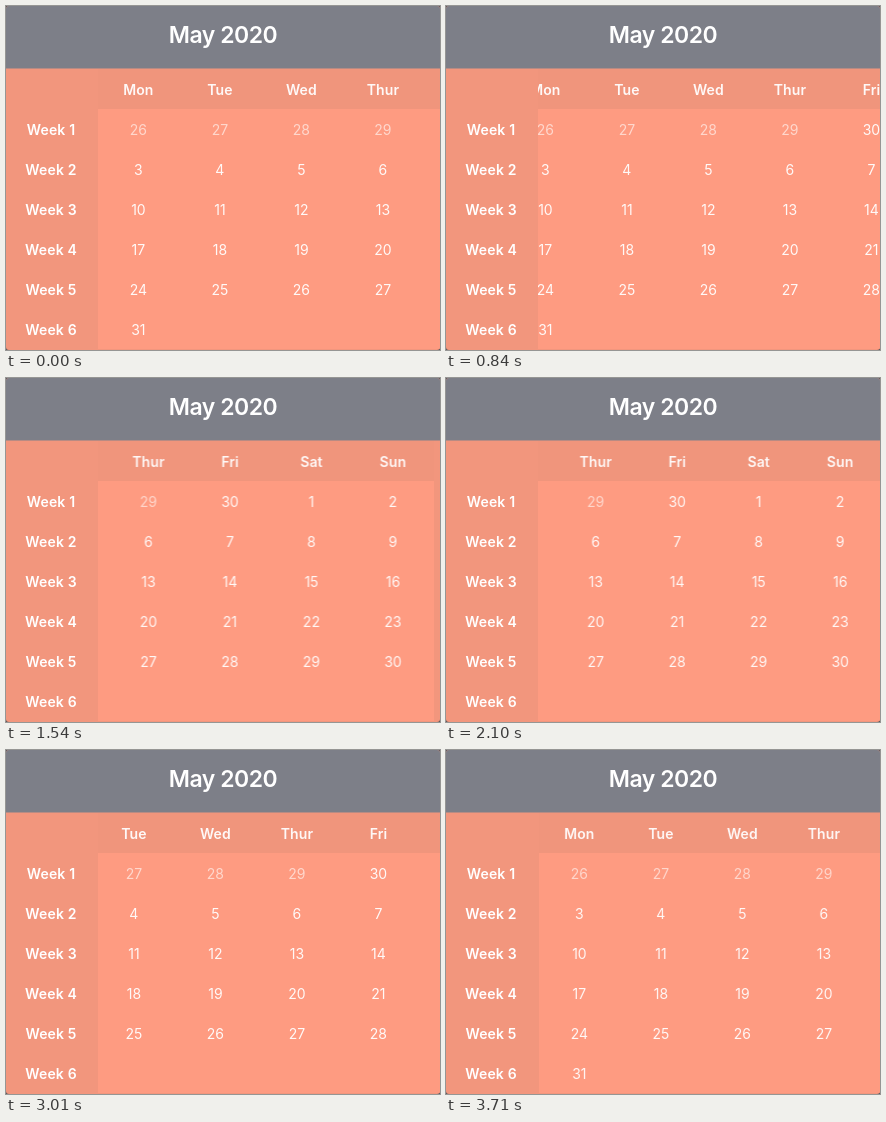
Recreate the animation shown at these times as an HTML page. Size 434x344 px, loop 3.78 s.

```html
<!DOCTYPE html>
<html lang="en">
<head>
<meta charset="utf-8">
<title>Calendar</title>
<style>
  html, body { margin: 0; width: 100%; height: 100%; overflow: hidden; background: #55565c; }
  #app {
    position: relative; width: 434px; height: 344px; overflow: hidden;
    border-radius: 3px; background: #f2967d; color: #fff;
    font: 400 14px/40px Inter, "Open Sans", sans-serif; text-align: center;
  }
  h1 {
    margin: 0; height: 62px; background: #7d7f88; border-bottom: 1px solid #b88b83;
    font-size: 23px; line-height: 58.5px; font-weight: 600; letter-spacing: -.5px;
  }
  #weeks { position: absolute; left: 0; top: 103.5px; width: 90px; font-weight: 600; letter-spacing: .15px; }
  #view { position: absolute; left: 92px; top: 63px; right: 0; bottom: 0; overflow: hidden; }
  #grid { position: absolute; left: 0; top: 0; width: 569.5px; height: 280px; will-change: transform; }
  #grid::before { content: ""; position: absolute; inset: 0 0 auto; height: 40px; background: #f0957c; }
  #grid::after { content: ""; position: absolute; inset: 40px 0 0; background: #fe9b81; }
  #grid span { position: absolute; z-index: 1; width: 80px; height: 40px; opacity: .94; }
  #grid .day { font-weight: 600; letter-spacing: .1px; }
  #grid .dim { opacity: .6; }
</style>
</head>
<body>
<div id="app">
  <h1>May 2020</h1>
  <div id="weeks"></div>
  <div id="view"><div id="grid"></div></div>
</div>
<script>
  const LOOP = 3780, STEP = 70, PITCH = 81.5;
  const grid = document.getElementById('grid');
  const weeks = document.getElementById('weeks');

  function add(parent, tag, text, cls = '') {
    const el = document.createElement(tag);
    el.textContent = text;
    el.className = cls;
    parent.append(el);
    return el;
  }

  function cell(text, col, row, cls) {
    const el = add(grid, 'span', text, cls);
    el.style.left = col * PITCH + 0.4 + 'px';
    el.style.top = row * 40 + 0.5 + 'px';
  }

  ['Mon', 'Tue', 'Wed', 'Thur', 'Fri', 'Sat', 'Sun'].forEach((d, i) => cell(d, i, 0, 'day'));
  // the first row starts on April 26
  for (let i = 0; i < 36; i++) {
    const date = i < 5 ? 26 + i : i - 4;
    cell(date, i % 7, Math.floor(i / 7) + 1, i < 4 ? 'dim' : '');
  }
  for (let w = 1; w <= 6; w++) add(weeks, 'div', 'Week ' + w);

  // [time, offset]: flick, overshoot, rest, flick back, overshoot, settle
  const keys = [
    [0, 0], [680, 0], [840, 33], [1190, 206.3], [1365, 237], [1890, 227.3],
    [2730, 227.3], [3010, 86], [3290, -16], [LOOP, 0]
  ];

  // Level at turning points, otherwise the chord through both neighbours
  function slope(i) {
    const a = keys[i - 1], b = keys[i], c = keys[i + 1];
    if (!a || !c || (b[1] - a[1]) * (c[1] - b[1]) <= 0) return 0;
    return (c[1] - a[1]) / (c[0] - a[0]);
  }

  function scrollAt(t) {
    let i = 0;
    while (keys[i + 1][0] <= t) i++;
    const [t0, p0] = keys[i], [t1, p1] = keys[i + 1];
    const d = t1 - t0, u = (t - t0) / d, v = 1 - u;
    return p0 + (p1 - p0) * u * u * (3 - 2 * u)
      + d * u * v * (slope(i) * v - slope(i + 1) * u);
  }

  const start = performance.now();
  function draw() {
    const t = Math.max(0, performance.now() - start) % LOOP;
    const x = scrollAt(Math.floor(t / STEP) * STEP);
    grid.style.transform = `translateX(${-x}px)`;
    requestAnimationFrame(draw);
  }
  draw();
</script>
</body>
</html>
```
